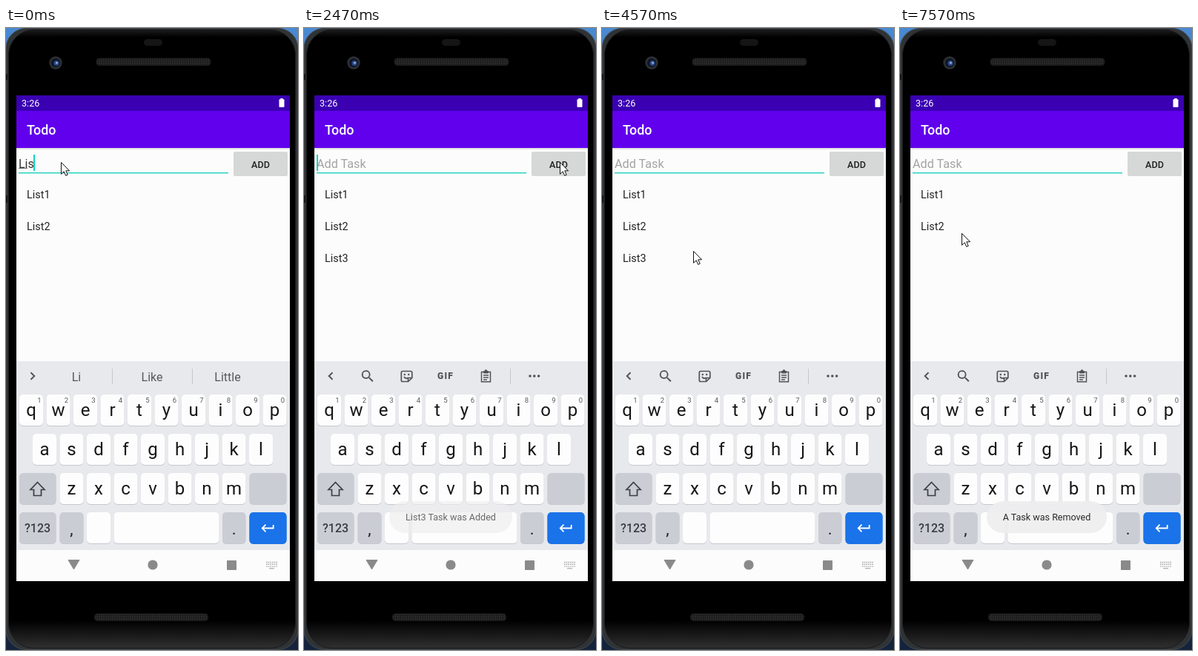
Write an HTML page that moves like this. It is 394 px wide and 840 px high and loops after 7990 ms.

```html
<!DOCTYPE html>
<html lang="en">
<head>
<meta charset="utf-8">
<title>Todo</title>
<style>
html, body { margin: 0; width: 100%; height: 100%; overflow: hidden; background: #14233c; }
svg { display: block; width: 394px; height: 840px; }
text { font-family: Roboto, "Open Sans", sans-serif; white-space: pre; }
.mid { text-anchor: middle; }
.line { fill: none; stroke: #505357; stroke-width: 1.7; }
</style>
</head>
<body>
<svg id="stage" viewBox="0 0 394 840" xmlns="http://www.w3.org/2000/svg"></svg>
<script>
const LOOP = 7990;

// --- markup helpers ---
const rect = (x, y, w, h, fill, r = 0, more = "") =>
  `<rect x="${x}" y="${y}" width="${w}" height="${h}" rx="${r}" fill="${fill}" ${more}/>`;
const circle = (x, y, r, fill) => `<circle cx="${x}" cy="${y}" r="${r}" fill="${fill}"/>`;
const text = (str, x, y, size, fill, more = "") =>
  `<text x="${x}" y="${y}" font-size="${size}" fill="${fill}" ${more}>${str}</text>`;
const mid = (str, x, y, size, fill, more = "") => text(str, x, y, size, fill, `class="mid" ${more}`);
const line = (d, more = "") => `<path class="line" d="${d}" ${more}/>`;
const icon = (d, x, y, fill) => `<path transform="translate(${x} ${y}) scale(.9)" d="${d}" fill="${fill}"/>`;
const group = (id, body) => `<g id="${id}">${body}</g>`;

const defs = `<defs>
  <pattern id="mesh" width="3" height="3" patternUnits="userSpaceOnUse">
    <rect width="3" height="3" fill="#2a2a2a"/><circle cx="1.5" cy="1.5" r=".9" fill="#111"/>
  </pattern>
  <linearGradient id="wall" x2="0" y2="1">
    <stop offset="0" stop-color="#4a8ad2"/><stop offset=".3" stop-color="#2b5a92"/><stop offset="1" stop-color="#14233c"/>
  </linearGradient>
  <linearGradient id="glass" x2="0" y2="1">
    <stop offset="0" stop-color="#1c1c1c"/><stop offset=".012" stop-color="#000"/>
    <stop offset=".955" stop-color="#000"/><stop offset="1" stop-color="#303030"/>
  </linearGradient>
  <linearGradient id="drop" x2="0" y2="1">
    <stop offset="0" stop-color="#000" stop-opacity=".16"/><stop offset="1" stop-color="#000" stop-opacity="0"/>
  </linearGradient>
</defs>`;

function phone() {
  return rect(0, 0, 394, 840, "url(#wall)")
    + rect(0, .5, 394, 839, "#303335", 27, 'stroke="#46494b"')
    + rect(3.5, 2.5, 387, 835, "url(#glass)", 34, 'stroke="#17191a"')
    + rect(0, 62, 2, 8, "#141617") + rect(0, 226, 2, 10, "#141617")
    + rect(186, 15, 25, 9, "#151515", 4.5)
    + rect(122, 41, 154, 9.5, "url(#mesh)", 4, 'stroke="#1b1b1b"')
    + rect(119.5, 791, 153, 9.5, "url(#mesh)", 4, 'stroke="#1b1b1b"')
    + circle(67, 47, 8.7, "#2d2f33") + circle(67, 47, 6, "#0e1526")
    + circle(68, 47.5, 3.6, "#2b4a86") + circle(68.5, 47, 1.6, "#8fabe0");
}

function app() {
  return rect(14, 91, 369, 656, "#fcfcfc")
    + rect(14, 91, 369, 21, "#3a00b2") + rect(14, 112, 369, 50, "#6100ed")
    + rect(14, 162, 369, 3, "url(#drop)")
    + text("3:26", 21, 106.3, 12.6, "#fff")
    + rect(368.5, 96.3, 7, 10.7, "#fff", 1) + rect(370.3, 95, 3.4, 2, "#fff")
    + text("Todo", 28, 144.3, 17.9, "#fff", 'font-weight="500"')
    + rect(17, 195, 283, 1.4, "#1fcfc0")
    + text("Add Task", 17, 188.5, 16.2, "#a3a3a3", 'id="hint"')
    + text("", 17, 188.5, 16, "#333", 'id="entry"')
    + rect(17, 189, 12, 1, "#777", 0, 'id="under"')
    + rect(17, 171, 2, 22, "#10d3c2", 0, 'id="caret"')
    + rect(307.5, 169, 72, 33, "#000", 2, 'id="lift" opacity=".18"')
    + rect(307, 167, 73, 33, "#d6d7d7", 2, 'id="add"')
    + mid("ADD", 343.5, 188.7, 12.6, "#212121", 'font-weight="500"')
    + [1, 2, 3].map(n => text("List" + n, 28, 187 + 43 * n, 14.4, "#222", `id="item${n}"`)).join("");
}

function key(x, y, w, fill, edge = "#c6c8cd") {
  return rect(x, y + 1, w, 42, edge, 5) + rect(x, y, w, 42, fill, 5);
}

function keyRow(letters, x, y, hints) {
  return [...letters].map((c, i) => {
    const cx = x + 36.5 * i;
    return key(cx - 16, y, 32, "#fdfdfd") + mid(c, cx, y + 29, 24, "#161616")
      + (hints ? mid((i + 1) % 10, cx + 11, y + 11, 9.5, "#55585c") : "");
  }).join("");
}

function keyboard() {
  const gray = "#cacdd4", white = "#fdfdfd", blue = "#1a73e8";
  return rect(14, 450, 369, 255, "#e8e9ed")
    + keyRow("qwertyuiop", 34, 495, true) + keyRow("asdfghjkl", 52, 548) + keyRow("zxcvbnm", 88.5, 601)
    + key(18, 601, 49.5, gray) + key(328.5, 601, 50, gray)
    + key(18, 654, 49.5, gray) + key(72.5, 654, 32, gray) + key(109, 654, 32, white)
    + key(145.5, 654, 142, white) + key(292, 654, 31.5, gray) + key(328.5, 654, 50, blue, blue)
    + line("M42.5 613.5L52 623.5H47.5V631.5H37.5V623.5H33Z", 'style="stroke:#3c4043"')
    + mid("?123", 42.6, 681, 16, "#3a3d41", 'font-weight="500"')
    + mid(",", 88.5, 684, 22, "#202124") + mid(".", 307.7, 684, 22, "#202124")
    + icon("M19 7V11H5.8L9.4 7.4L8 6L2 12L8 18L9.4 16.6L5.8 13H21V7Z", 342.7, 664.7, "#fff");
}

function navBar() {
  const gray = "#8a8a8a", pale = "#a9a9a9";
  const dots = [0, 1, 2].map(r =>
    `<path d="M351 ${721.5 + 2.8 * r}h15" stroke="${pale}" stroke-width="1.4" stroke-dasharray="1.6 1.08"/>`);
  return rect(14, 705, 369, 42, "#fcfcfc")
    + `<path d="M84 718.5H99L91.5 731Z" fill="${gray}" stroke="${gray}" stroke-linejoin="round"/>`
    + circle(198, 725, 6.6, gray) + rect(298, 719, 13, 13, gray, .8)
    + dots.join("") + rect(355, 729.2, 7, 1.2, pale);
}

const divider = x => rect(x, 460, 1, 21, "#c5c7cb");

function words() {
  return line("M33.5 465.3L38.3 470L33.5 474.7", 'style="stroke-width:1.9"')
    + group("splits", divider(143) + divider(251))
    + [95, 197, 299].map((x, i) => mid("", x, 476.5, 16, "#55585c", `id="word${i}"`)).join("");
}

function tools() {
  return line("M38.5 465.3L33.7 470L38.5 474.7", 'style="stroke-width:1.9"')
    + icon("M15.5 14H14.7L14.4 13.7A6.5 6.5 0 1 0 13.7 14.4L14 14.7V15.5L19 20.5L20.5 19ZM9.5 14A4.5 4.5 0 1 1 9.5 5A4.5 4.5 0 1 1 9.5 14Z", 75.1, 459.5, "#505357")
    + line("M133 463.5H144Q145.8 463.5 145.8 465.3V472.5L140.5 477.5H133Q131.3 477.5 131.3 475.8V465.3Q131.3 463.5 133 463.5ZM145.5 472.5H140.5V477.5M135 471Q137 474.3 140 472.6")
    + circle(135.8, 468, 1.2, "#505357") + circle(141.2, 468, 1.2, "#505357")
    + text("GIF", 180, 474.4, 12, "#505357", 'font-weight="900" letter-spacing="1.2"')
    + line("M239.5 464.5H251.5V477.7H239.5ZM242 469H249M242 472H249M242 475H247", 'style="stroke-width:1.5"')
    + rect(242, 463, 7, 3.5, "#505357", 1) + circle(245.5, 463, 1.8, "#505357")
    + divider(278) + [305, 310.8, 316.6].map(x => circle(x, 470, 1.8, "#505357")).join("");
}

const toast = rect(115, 639, 166, 43, "#eeeeef", 21.5, 'id="pill" fill-opacity=".93"')
  + mid("", 198, 665, 12.55, "#2b2b2b", 'id="note"');
const pointer = '<path d="M.5 .5V16.3L4.2 12.8L6.7 18.4L9.2 17.3L6.8 11.8H11.6Z" fill="#fff" stroke="#111"/>';

const stage = document.getElementById("stage");
stage.innerHTML = defs + phone() + app() + keyboard() + group("words", words()) + group("tools", tools())
  + navBar() + group("toast", toast) + group("pointer", pointer);
const $ = id => document.getElementById(id);
const set = (id, attr, value) => $(id).setAttribute(attr, value);
const show = (id, on) => set(id, "visibility", on ? "visible" : "hidden");
const write = (id, str) => { if ($(id).textContent !== str) $(id).textContent = str; };

// --- timeline: every row is [start, ...values] and holds until the next ---
const moves = [
  [0, 74, 181], [1320, 267, 181], [1440, 318, 178], [1570, 344, 174], [1960, 345, 174], [2110, 345, 181],
  [2880, 300, 246], [3010, 227, 315], [3160, 207, 333], [3300, 150, 327], [3430, 101, 319], [3580, 83, 319],
  [3850, 77, 312], [3990, 95, 304], [4150, 123, 301], [4940, 114, 305], [6840, 113, 304],
  [6990, 98, 292], [7130, 88, 281], [7260, 84, 277], [7570, 83, 277]
];
const typed = [[0, "Lis", 20], [270, "List", 25], [660, "List3", 34], [2350, "", 0]];
const marked = [[0, 12], [120, 20], [390, 25], [920, 34], [2350, 0]];
const guesses = [
  [0, "Li", "Like", "Little"], [120, "Lis", "List", "Lists"],
  [390, "List", "Listen", "Lists"], [920, "", "List3", ""]
];
const blinks = [0, 1440, 1960, 2620, 3160, 3730, 4150, 4570, 5060, 5590, 6090, 6580, 7130, 7570];
const fades = [
  [0, 0], [2350, .25], [2470, .7], [2620, .93], [2740, 1], [4150, .9], [4270, .6], [4420, .25], [4570, 0],
  [6090, .2], [6210, .65], [6330, 1]
];
const at = (rows, t) => rows.findLast(row => row[0] <= t).slice(1);

function draw(t) {
  const [x, y] = at(moves, t);
  set("pointer", "transform", `translate(${x} ${y})`);

  const [str, width] = at(typed, t);
  write("entry", str);
  show("hint", !str);
  set("under", "width", at(marked, t)[0]);
  set("caret", "x", 17 + width);
  show("caret", blinks.filter(b => b <= t).length % 2);

  const pressed = t >= 2110 && t < 2350;
  set("add", "fill", pressed ? "#b7b8b8" : "#d6d7d7");
  show("lift", pressed);
  show("item3", t >= 2350 && t < 6090);

  const cleared = t >= 2350;
  show("words", !cleared);
  show("tools", cleared);
  at(guesses, t).forEach((w, i) => write("word" + i, w));
  set("splits", "opacity", t < 920 ? 1 : 0);

  const removed = t >= 6090;
  write("note", removed ? "A Task was Removed" : "List3 Task was Added");
  set("pill", "x", removed ? 117 : 115);
  set("pill", "width", removed ? 162 : 166);
  set("toast", "opacity", at(fades, t)[0]);
}

const start = performance.now();
function tick() {
  draw((performance.now() - start) % LOOP);
  requestAnimationFrame(tick);
}
tick();
</script>
</body>
</html>
```
